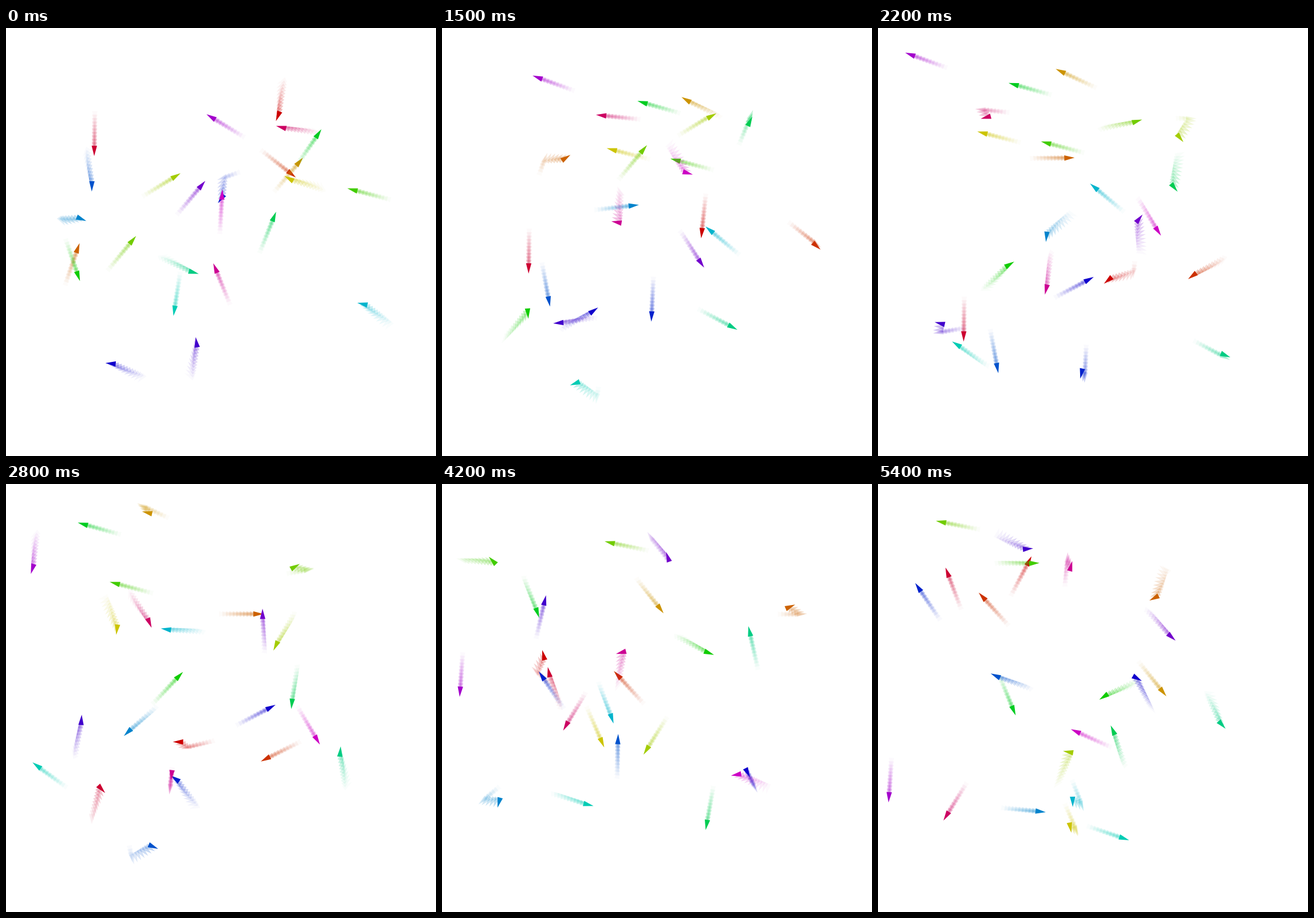
These frames come from a looping animation (751x746 px, 5500 ms). A matplotlib script:

```python
import colorsys
import numpy as np
import matplotlib.pyplot as plt
from matplotlib.animation import FuncAnimation
from matplotlib.collections import PolyCollection

W, H = 751, 746
TICK, LOOP = 100, 5500
STEP, TRAIL = 6, 10  # spacing and number of fading copies
STEER = 0.0235       # turning strength per pixel travelled
SHAPE = np.array([(9, 0), (-9, -4.7), (-9, 4.7)])

# the picture only refreshes at these moments
REFRESH = np.array([0, 200, *range(400, 2600, 100), 2800, 3000, 3100, 3300,
                    3600, 3800, 4000, 4200, 4500, 4700, 5000, 5200, 5400])
# pixels flown by every bird at a few moments
CLOCK = [0, 800, 1500, 2200, 3300, 4200, 5400]
FLOWN = [0, 99, 204, 322, 518, 644, 829]
ODO = np.arange(-STEP * TRAIL, FLOWN[-1] + 1)

flock = []


def bird(*turns, skew=0):
    """Fly at constant speed from turn to turn; the nose swings after the
    course with a force that follows the sine of the angle between them."""
    xs, ys = np.array(turns, float).T
    dx, dy = np.diff(xs), np.diff(ys)
    course = np.arctan2(dy, dx)
    miles = np.append(0, np.cumsum(np.hypot(dx, dy)))
    miles = ODO[0] + miles * (ODO[-1] - ODO[0]) / miles[-1]
    legs = np.searchsorted(miles[1:-1], ODO, side="right")
    noses = [course[0] + np.radians(skew)]
    for leg in legs[1:]:
        noses.append(noses[-1] + STEER * np.sin(course[leg] - noses[-1]))
    flock.append((np.interp(ODO, miles, xs), np.interp(ODO, miles, ys),
                  np.array(noses)))


# start, corners and end of each flight, in order of hue
bird((481, 94), (446, 430), (312, 460), (163, 325), (264, 134), skew=60)
bird((452, 218), (657, 379), (444, 484), (182, 196))
bird((106, 440), (180, 226), (630, 227), (499, 146), (482, 199))
bird((474, 279), (554, 184), (236, 37), (498, 363))
bird((552, 277), (160, 177), (348, 607), (336, 599), skew=60)
bird((246, 289), (469, 153), (549, 158), (304, 548), (332, 467))
bird((183, 416), (383, 174), (532, 149), (110, 66))
bird((663, 297), (34, 132), (273, 138))
bird((107, 376), (152, 508), (106, 545), (384, 247), (514, 322), (394, 371))
bird((512, 233), (546, 184), (99, 60), (237, 395))
bird((446, 384), (540, 151), (461, 600), (410, 429))
bird((275, 398), (608, 575), (536, 252), (601, 420), skew=-50)
bird((303, 434), (270, 647), (52, 490), (430, 618))
bird((668, 519), (351, 255), (235, 252), (357, 562), (340, 554), skew=-90)
bird((122, 336), (97, 337), (363, 306), (70, 553), (284, 571), skew=-145)
bird((139, 217), (220, 655), (306, 603), (308, 368), (205, 334), skew=45)
bird((400, 254), (377, 262), (361, 611), (70, 180))
bird((236, 611), (134, 561), (480, 380), (547, 530), (453, 339), skew=-75)
bird((320, 606), (345, 490), (104, 531), (207, 84), (262, 113), skew=-75)
bird((304, 319), (356, 257), (464, 428), (447, 212), (362, 89), (513, 267))
bird((409, 186), (358, 155), (53, 45), (19, 546))
bird((374, 350), (384, 176), (603, 547), (345, 431))
bird((388, 474), (310, 282), (286, 535), (331, 127), (337, 143))
bird((540, 179), (178, 142), (292, 299), (119, 579), skew=35)
bird((155, 154), (149, 587), (212, 395), (121, 154))

# oldest copy first, the solid head last
AGES = np.arange(TRAIL, -1, -1)
ALPHAS = np.where(AGES == 0, 1, 0.27 * (1 - AGES / (TRAIL + 1)))
COLORS = [(*colorsys.hsv_to_rgb(i / len(flock), 1, 0.8), a)
          for i in range(len(flock)) for a in ALPHAS]


def arrows(flown):
    at = flown - STEP * AGES
    px, py = SHAPE.T
    tris = []
    for track in flock:
        x, y, nose = (np.interp(at, ODO, v)[:, None] for v in track)
        c, s = np.cos(nose), np.sin(nose)
        tris.extend(np.stack([x + c * px - s * py,
                              y + s * px + c * py], axis=-1))
    return tris


fig = plt.figure(figsize=(W / 100, H / 100), dpi=100, facecolor="white")
ax = fig.add_axes([0, 0, 1, 1])
ax.set_xlim(0, W)
ax.set_ylim(H, 0)
ax.axis("off")
swarm = PolyCollection(arrows(0), facecolors=COLORS, edgecolors="none",
                       linewidths=0)
ax.add_collection(swarm)


def draw(frame):
    now = REFRESH[REFRESH <= frame * TICK][-1]
    swarm.set_verts(arrows(np.interp(now, CLOCK, FLOWN)))
    return [swarm]


anim = FuncAnimation(fig, draw, frames=LOOP // TICK, interval=TICK,
                     repeat=True, repeat_delay=0)
plt.show()
```
